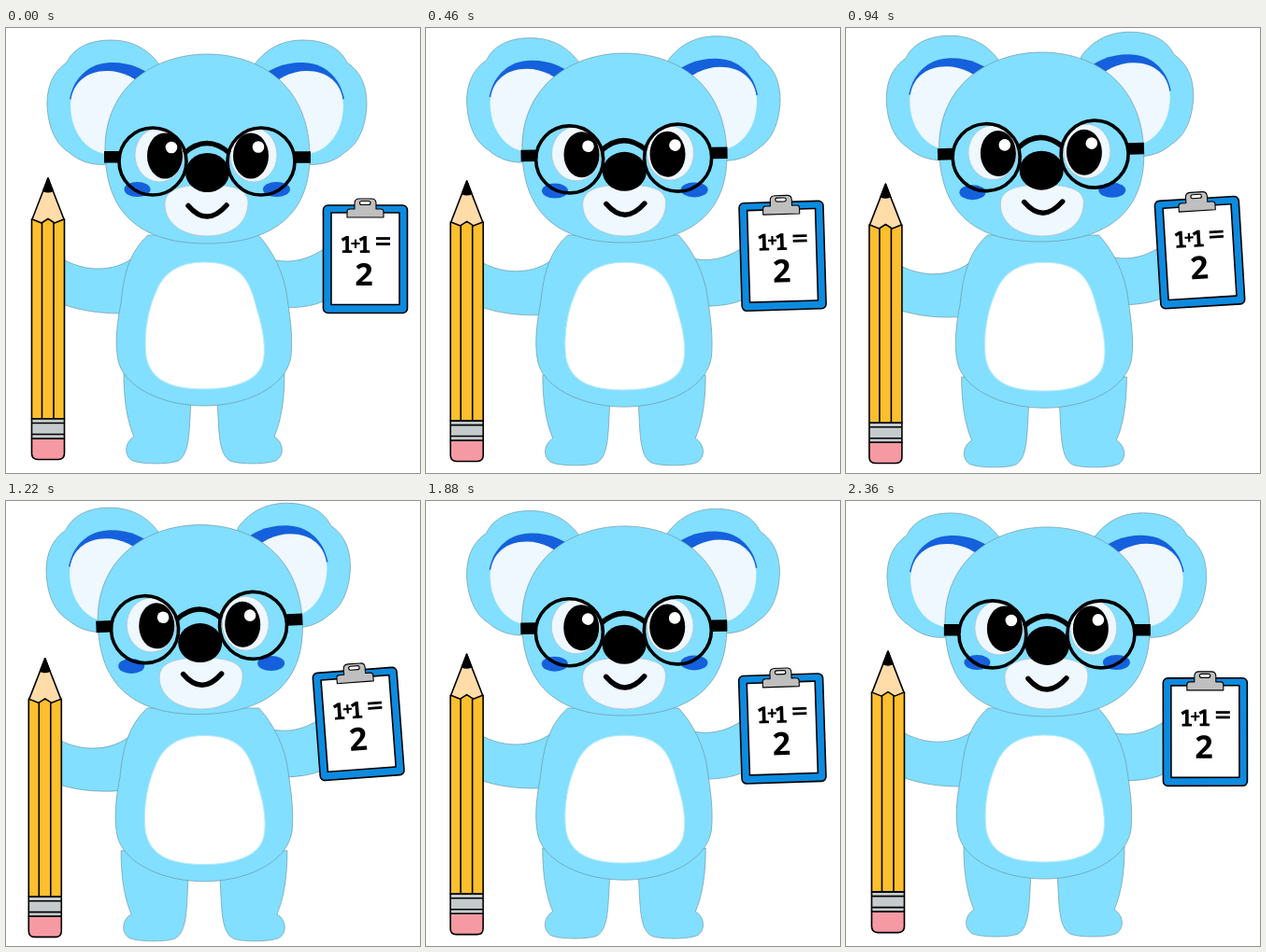
An HTML page for the animation above (2.38 s loop, 443 px wide and 477 px high).

```html
<!DOCTYPE html>
<html lang="en">
<head>
<meta charset="utf-8">
<title>Koala with pencil</title>
<style>
  html, body { margin: 0; height: 100%; overflow: hidden; background: #fff; }
  svg { display: block; width: 443px; height: 477px; }
  .fur { fill: #82dfff; stroke: #6d98aa; stroke-width: .7; }
  .pale { fill: #eff7ff; }
  .blue { fill: #1560dc; }
  .ink { stroke: #000; stroke-width: 1.6; stroke-linejoin: round; }
  .line { fill: none; stroke: #000; }
  text { font: 600 25px "Noto Sans Mono", monospace; font-stretch: 62.5%; text-anchor: middle; }
  text.equals { font: 700 24px "DejaVu Sans", sans-serif; }
</style>
</head>
<body>
<svg viewBox="0 0 443 477">
  <defs>
    <g id="ear">
      <path class="fur" d="M164 39C150 20 132 13 112 13C91 13 73 20 65 37C49 48 44 64 44 82C45 108 54 125 67 133C78 143 93 148 110 146L175 110Z"/>
      <path class="blue" d="M68 76C73 51 91 37 113 37C135 37 150 45 162 56L130 90Z"/>
      <path class="pale" d="M69 82C70 58 87 46 108 46C125 46 140 54 151 66L112 136C86 134 69 112 69 82Z"/>
    </g>
    <path id="leg" class="fur" d="M126 370C126 400 130 422 137 438C127 444 126 457 134 463C142 468 175 468 184 464C197 457 196 432 198 398L190 370Z"/>
  </defs>

  <g id="leftLeg"><use href="#leg"/></g>
  <g id="rightLeg"><use href="#leg" transform="matrix(-1 0 0 1 424 0)"/></g>
  <path id="leftArm" class="fur" d="M50 240C77 263 117 264 140 243L150 300L123 306C100 306 75 303 50 292Z"/>
  <path id="rightArm" class="fur" d="M280 247C305 254 325 249 350 230V287C335 297 322 300 290 300Z"/>
  <g id="body">
    <path class="fur" d="M152 222C132 240 126 264 123 295C117 325 117 345 121 360C130 388 172 405 212 405C255 405 300 386 305 352C307 330 304 310 301 290C298 262 284 237 270 222Z"/>
    <path fill="#fff" stroke="#b9e9fb" d="M212 251C251 251 261 270 268 300C276 325 278 345 275 358C270 380 240 387 212 387C180 387 155 380 150 352C147 325 153 300 160 284C168 262 185 251 212 251Z"/>
  </g>

  <g id="leftEar"><use href="#ear"/></g>
  <g id="rightEar"><use href="#ear" transform="matrix(-1 0 0 1 430 0)"/></g>
  <path id="head" class="fur" d="M215 28C272 28 325 62 325 138C325 200 285 231 215 231C145 231 106 200 106 130C106 62 160 28 215 28Z"/>
  <ellipse id="leftBlush" class="blue" cx="140.5" cy="173" rx="14" ry="8"/>
  <ellipse id="rightBlush" class="blue" cx="289.5" cy="173" rx="14.5" ry="8"/>
  <path id="muzzle" class="pale" stroke="#a9c4d0" stroke-width=".8" d="M170 189C170 172 190 168 215 168C240 168 259 172 259 187C259 210 240 223 215 223C190 223 170 210 170 189Z"/>
  <g id="eyes">
    <ellipse class="pale" stroke="#a9c4d0" stroke-width=".8" cx="164" cy="136" rx="26" ry="29"/>
    <ellipse class="pale" stroke="#a9c4d0" stroke-width=".8" cx="265" cy="136" rx="25" ry="29"/>
    <ellipse cx="170" cy="137" rx="19" ry="24.5"/>
    <ellipse cx="262" cy="137" rx="19" ry="24.5"/>
    <circle fill="#fff" cx="177" cy="128" r="6.3"/>
    <circle fill="#fff" cx="270" cy="127.5" r="6.3"/>
  </g>
  <ellipse id="nose" cx="215.5" cy="155" rx="23.5" ry="21"/>
  <path id="smile" class="line" stroke-width="5.5" stroke-linecap="round" d="M195 190.500Q215 214 236 190"/>
  <g id="glasses" class="line" stroke-width="3.6">
    <circle cx="157" cy="143" r="36"/>
    <circle cx="273" cy="143" r="36"/>
    <path stroke-width="5.500" d="M191 134Q215 113 239 134"/>
    <path stroke-width="12.500" d="M105 138.300H121M309 138.500H326"/>
  </g>

  <g id="pencil" class="ink">
    <path fill="#fcbf2e" d="M27.500 205H62.500V419H27.500Z"/>
    <path fill="none" d="M38.500 208V419M51 208V419"/>
    <path fill="#ffdca8" d="M45 161L28 205L38 209L45 204.500L52 209L62 205Z"/>
    <path d="M45 161L39.800 174.500Q45 177 50 174.500Z"/>
    <path fill="#f59aa2" d="M27.500 440H62.500V456Q62.500 462.500 56 462.500H34Q27.500 462.500 27.500 456Z"/>
    <path fill="#c5cacc" d="M27.500 419H62.500V440H27.500ZM27.500 423.500H62.500M27.500 435.500H62.500"/>
  </g>

  <g id="clipboard">
    <rect class="ink" fill="#0c8be0" x="339.500" y="190" width="90" height="115.500" rx="5"/>
    <rect class="ink" stroke-width="1" fill="#fff" x="348" y="198" width="73" height="98.500"/>
    <path class="ink" style="stroke-width:1.1" fill="#bfbfbf" d="M373 194V188Q373 183 378 183H391Q396 183 396 188V194H401Q404 194 404 197V203H365V197Q365 194 368 194Z"/>
    <rect class="ink" style="stroke-width:1.1" fill="#fff" x="378.500" y="185.500" width="11.500" height="4" rx="2"/>
    <text x="364.500" y="241.500">1</text>
    <text x="374" y="238" style="font-size:20px">+</text>
    <text x="383.500" y="241.500">1</text>
    <text class="equals" x="403.500" y="237">=</text>
    <text x="383" y="276" style="font-size:34px">2</text>
  </g>
</svg>
<script>
const LOOP = 2380;

// Full swing of each part: dx, dy, degrees, pivot x, pivot y, growth x, growth y
const swings = {
  leftLeg: [-3, 5],
  rightLeg: [3, 5],
  leftArm: [0, 3, -6, 136, 246],
  rightArm: [0, -4, -2, 300, 270],
  body: [0, 0, 0, 212, 225, .012, .016],
  leftEar: [-1, -6],
  rightEar: [-18, -11],
  head: [-8, -2.5, -1, 215, 130],
  leftBlush: [-6.5, 4],
  rightBlush: [-6, 1],
  muzzle: [-6, 0],
  eyes: [-9, -4, -1, 215, 136],
  nose: [-8, -3],
  smile: [-5.5, -5],
  glasses: [-8.7, -7.7, -2.2, 215, 143],
  pencil: [-3.3, 5, 0, 45, 463, 0, -.01],
  clipboard: [-7.5, -9, -4.4, 384.5, 248]
};
const parts = Object.entries(swings).map(([id, swing]) => [document.getElementById(id), swing]);

function draw(now) {
  const phase = now % LOOP / LOOP;
  const p = 1 - Math.abs(1 - 2 * phase);
  for (const [part, [dx, dy, turn = 0, cx = 0, cy = 0, gx = 0, gy = 0]] of parts) {
    part.setAttribute("transform",
      `translate(${cx + dx * p} ${cy + dy * p}) rotate(${turn * p}) ` +
      `scale(${1 + gx * p} ${1 + gy * p}) translate(${-cx} ${-cy})`);
  }
}

const start = performance.now();
function tick() {
  draw(performance.now() - start);
  requestAnimationFrame(tick);
}
tick();
</script>
</body>
</html>
```
